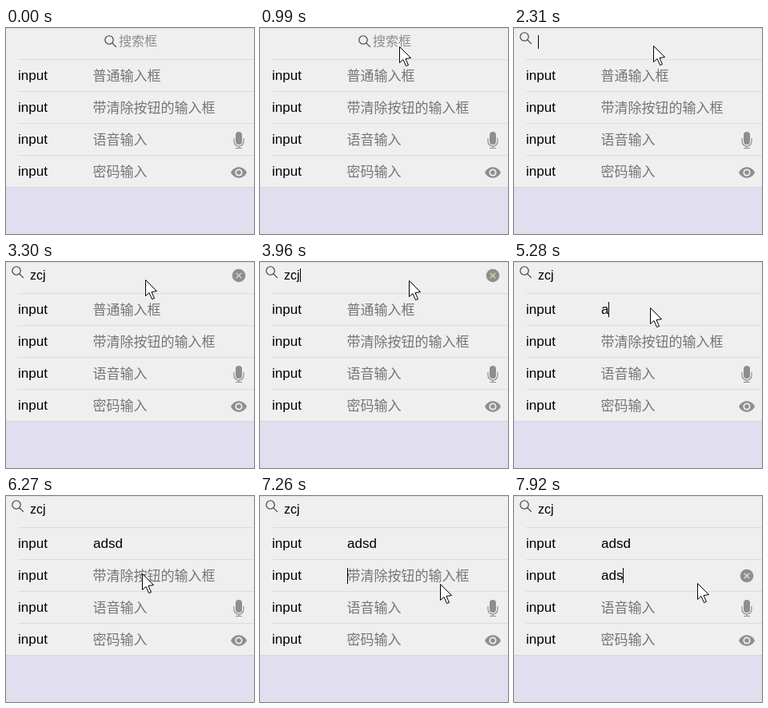
Write an HTML page with a canvas that moves like this. It is 310 px wide and 258 px high and loops after 8 s.

```html
<!DOCTYPE html>
<html lang="zh">
<head>
<meta charset="utf-8">
<style>
html, body { margin: 0; width: 100%; height: 100%; overflow: hidden; background: #e0deef; }
canvas { display: block; }
</style>
</head>
<body>
<canvas id="stage" width="310" height="258"></canvas>
<script>
const ctx = document.getElementById('stage').getContext('2d', { alpha: false });
const LOOP = 8000;
const PAPER = '#efefef', LINE = '#dcdcdc', ICON = '#8e8e8e', HINT = '#757575';
const LATIN = '"Liberation Sans", Arial, sans-serif';
const CJK = '"Noto Sans CJK SC", "Noto Sans CJK", sans-serif';

const hints = ['普通输入框', '带清除按钮的输入框', '语音输入', '密码输入'];

// Each step changes part of the state: [time, changes]; focus 0 is the search field.
const steps = [
  [0, { search: '', first: '', second: '', open: false, focus: 0, caret: false, mouse: null }],
  [660, { mouse: [158, 62] }],
  [990, { mouse: [174, 23] }],
  [1320, { open: true, caret: true, mouse: [174, 22] }],
  [1650, { caret: false }],
  [2310, { caret: true }],
  [2640, { search: 'z' }],
  [2970, { search: 'zcj' }],
  [3300, { caret: false }],
  [3960, { caret: true, mouse: [186, 23] }],
  [4290, { mouse: [144, 82] }],
  [4620, { caret: false, mouse: [170, 57] }],
  [4950, { focus: 1, caret: true }],
  [5280, { first: 'a' }],
  [5610, { first: 'ads' }],
  [5940, { first: 'adsd' }],
  [6270, { caret: false, mouse: [170, 97] }],
  [6600, { mouse: [181, 110] }],
  [6930, { caret: true, mouse: [182, 110] }],
  [7260, { focus: 2, mouse: [225, 110] }],
  [7590, { second: 'ad', mouse: [229, 109] }],
  [7920, { second: 'ads' }]
];

function stateAt(time) {
  const state = {};
  for (const [start, change] of steps) if (start <= time) Object.assign(state, change);
  return state;
}

function rect(color, x, y, w, h) {
  ctx.fillStyle = color;
  ctx.fillRect(x, y, w, h);
}

function text(str, x, y, size, color, family) {
  ctx.font = `${size}px ${family}`;
  ctx.fillStyle = color;
  ctx.fillText(str, x, y);
}

function disc(x, y, r, color) {
  ctx.fillStyle = color;
  ctx.beginPath();
  ctx.arc(x, y, r, 0, 7);
  ctx.fill();
}

function stroke(color, width, path) {
  ctx.strokeStyle = color;
  ctx.lineWidth = width;
  ctx.beginPath();
  path();
  ctx.stroke();
}

function drawCaret(str, x, y, size, height) {
  ctx.font = `${size}px ${LATIN}`;
  rect('#000', Math.round(x + ctx.measureText(str).width), y, 1, height);
}

function drawLens(x, y) {
  stroke('#333', 1.1, () => {
    ctx.arc(x + 6, y + 6, 5.2, 0, 7);
    ctx.moveTo(x + 9.8, y + 9.8);
    ctx.lineTo(x + 14.8, y + 14.8);
  });
}

function drawClear(y, cross) {
  disc(291, y, 8.3, ICON);
  stroke(cross, 1.3, () => {
    for (const d of [-3.3, 3.3]) {
      ctx.moveTo(291 - d, y - 3.3);
      ctx.lineTo(291 + d, y + 3.3);
    }
  });
}

function drawMic() {
  ctx.fillStyle = ICON;
  ctx.beginPath();
  ctx.roundRect(287, 130, 8, 16, 4);
  ctx.fill();
  stroke(ICON, 1.2, () => {
    ctx.moveTo(285, 138);
    ctx.lineTo(285, 142);
    ctx.arc(291, 142, 6, Math.PI, 0, true);
    ctx.lineTo(297, 138);
    ctx.moveTo(291, 148);
    ctx.lineTo(291, 151);
    ctx.moveTo(287, 150.5);
    ctx.lineTo(295, 150.5);
  });
}

function drawEye() {
  ctx.fillStyle = ICON;
  ctx.beginPath();
  ctx.moveTo(281, 181);
  ctx.bezierCurveTo(285, 172, 297, 172, 301, 181);
  ctx.bezierCurveTo(297, 190, 285, 190, 281, 181);
  ctx.fill();
  disc(291, 181, 4.6, PAPER);
  disc(291, 181, 2.8, ICON);
}

function drawMouse([x, y]) {
  const shape = [[0, 0], [0, 20], [4.5, 16], [8, 24], [11, 23], [7.5, 15], [14, 14]];
  ctx.beginPath();
  for (const [dx, dy] of shape) ctx.lineTo(x + dx + 0.5, y + dy + 0.5);
  ctx.closePath();
  ctx.fillStyle = '#fff';
  ctx.fill();
  ctx.strokeStyle = '#000';
  ctx.lineWidth = 1;
  ctx.stroke();
}

function drawSearch(s) {
  if (s.open) {
    drawLens(7, 5);
    text(s.search, 30, 22, 16, '#000', LATIN);
  } else {
    drawLens(123, 9);
    text('搜索框', 141, 22, 16, '#8e8e8e', CJK);
  }
  if (s.search && s.focus === 0) drawClear(17, '#e2d5b4');
  if (s.caret && s.focus === 0) drawCaret(s.search, 30, s.search ? 8 : 9, 16, 17);
}

function drawRow(s, i) {
  const top = 39 + 40 * i;
  const value = [s.first, s.second][i] || '';
  rect(LINE, 15, top, 295, 1);
  text('input', 15, top + 26, 17, '#000', LATIN);
  if (value) text(value, 109, top + 26, 17, '#000', LATIN);
  else text(hints[i], 108.5, top + 26.5, 17, HINT, CJK);
  if (s.caret && s.focus === i + 1) drawCaret(value, 109, top + 11, 17, value ? 19 : 20);
}

function draw(time) {
  const s = stateAt(time);
  rect('#e0deef', 0, 0, 310, 258);
  rect(PAPER, 0, 0, 310, 199);
  rect(LINE, 0, 0, 310, 1);
  rect('#d6d5de', 0, 199, 310, 1);
  drawSearch(s);
  hints.forEach((_, i) => drawRow(s, i));
  if (s.second) drawClear(100, '#dfe3e3');
  drawMic();
  drawEye();
  if (s.mouse) drawMouse(s.mouse);
}

const begin = performance.now();
function tick() {
  draw((performance.now() - begin) % LOOP);
  requestAnimationFrame(tick);
}
tick();
</script>
</body>
</html>
```
